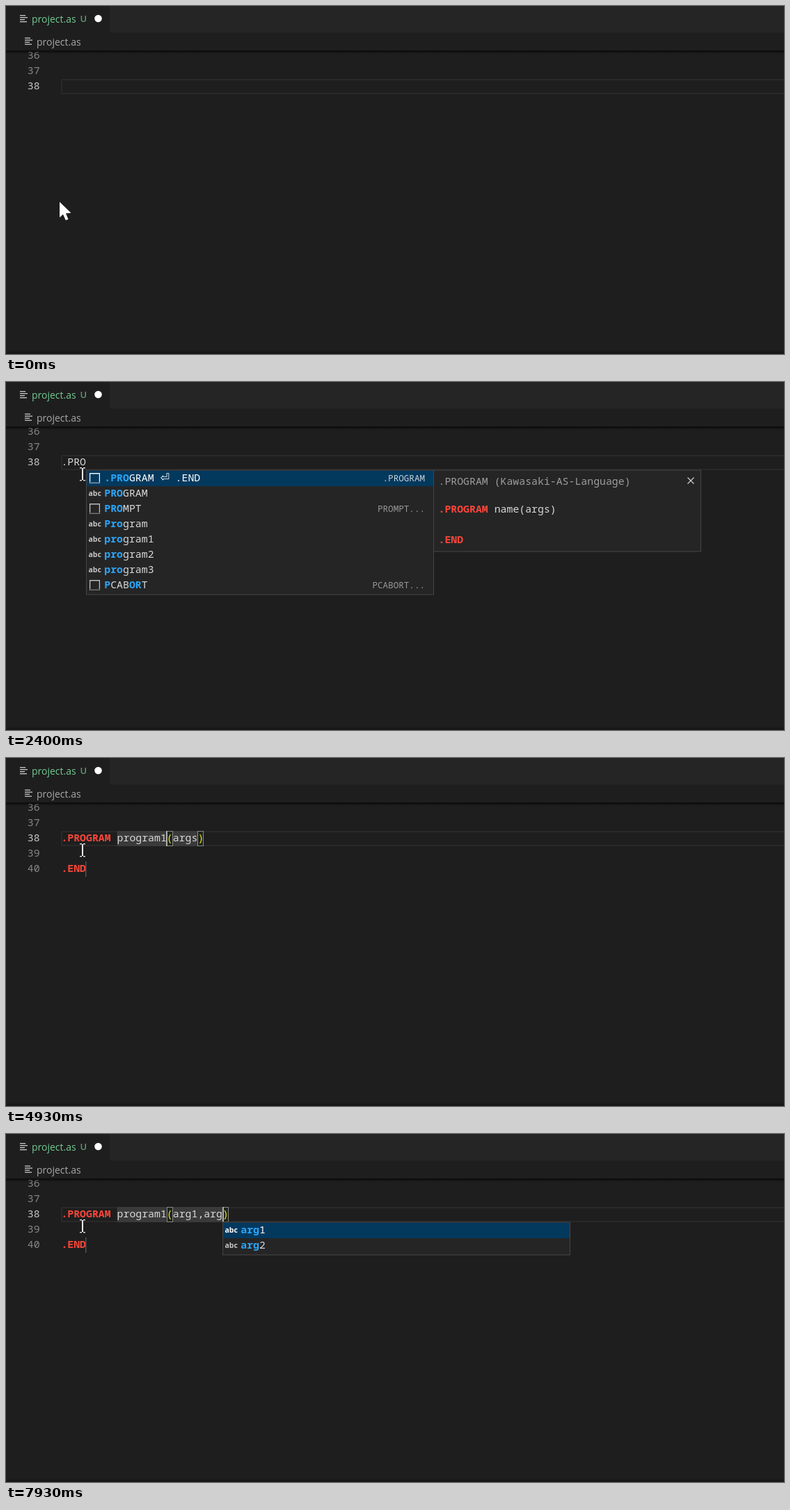
An HTML page with a canvas for the animation above (8 s loop, 1118 by 501 pixels).

```html
<!DOCTYPE html>
<html lang="en">
<head>
<meta charset="utf-8">
<title>Editor completion</title>
<style>
html, body { margin: 0; width: 100%; height: 100%; overflow: hidden; background: #1e1e1e; }
canvas { display: block; width: 1118px; height: 501px; }
</style>
</head>
<body>
<canvas id="stage" width="1118" height="501"></canvas>
<script>
const ctx = document.getElementById('stage').getContext('2d');
const LOOP = 8000, TICK = 1000 / 15;
const LEFT = 79.4, CHAR = 8.909, ROW = 22, POP_TOP = 126.5;
const MONO = '"Noto Sans Mono", "DejaVu Sans Mono", monospace';
const SANS = '"Open Sans", "Noto Sans", sans-serif';
const CODE = 14.85, SMALL = 12.6;
const TEXT = '#d8d8d8', RED = '#fb463a', BLUE = '#2aa5f7', GOLD = '#ffd91a', PANEL = '#252526', EDGE = '#454545';

// '#' marks a snippet row, braces mark matched letters
const words = ['program1', 'program2', 'program3', 'Program', 'PROGRAM'];
const lists = {
  P: ['#.PROGRAM \u23ce .END', 'PROGRAM', '#PROMPT', '#PRINT', '#PAUSE', '#PCABORT', '#PCEND', '#PCEXECUTE', 'Program', 'program1', 'program2', 'program3'],
  PRO: ['#{.PRO}GRAM \u23ce .END', 'PROGRAM', '#PROMPT', 'Program', 'program1', 'program2', 'program3', '#{P}CAB{OR}T'],
  p: [...words, '#PROMPT', '#PRINT', '#PAUSE', '#PCABORT', '#PCEND', '#PCEXECUTE', '#.PROGRAM \u23ce .END'],
  pro: [...words, '#PROMPT', '#.PROGRAM \u23ce .END', '#{P}CAB{OR}T'],
  prog: [...words, '#.PROGRAM \u23ce .END'],
  program1: ['program1'],
  a: ['arg1', 'arg2', '#ABORT', '#ABOVE', '#ABS', '#ACCEL', '#ACCURACY', '#ALIGN', '#AND', '#ASC', '#ATAN2', '#AVE_TRANS'],
  ar: ['arg1', 'arg2', '#{A}CCU{R}ACY', '#TIMER {(}comp{ar}e)', '#UTIMER {(}comp{ar}e)'],
  arg: ['arg1', 'arg2'],
  arg1: ['arg1']
};

// time, program name, arguments, caret column, list, matched letters, options
const steps = [
  [2800, 'name', 'args', 13, '', '', { select: [9, 13] }],
  [3800, 'p', 'args', 10],
  [3870, 'p', 'args', 10, 'p', 'p'],
  [3930, 'pr', 'args', 11, 'p', 'p'],
  [4000, 'pr', 'args', 11, 'pro', 'pr'],
  [4070, 'pro', 'args', 12, 'pro', 'pro'],
  [4200, 'prog', 'args', 13, 'prog', 'prog'],
  [4330, 'progr', 'args', 14, 'prog', 'progr'],
  [4400, 'progra', 'args', 15, 'prog', 'progra'],
  [4530, 'program', 'args', 16, 'prog', 'program'],
  [4670, 'program1', 'args', 17, 'program1', 'program1'],
  [4930, 'program1', 'args', 17],
  [5800, 'program1', 'args', 22, '', '', { select: [18, 22], pair: true }],
  [5870, 'program1', 'args', 22, '', '', { select: [18, 22] }],
  [6070, 'program1', 'a', 19],
  [6130, 'program1', 'a', 19, 'a', 'a'],
  [6200, 'program1', 'ar', 20, 'ar', 'ar'],
  [6400, 'program1', 'arg', 21, 'arg', 'arg'],
  [6670, 'program1', 'arg1', 22, 'arg1', 'arg1'],
  [7130, 'program1', 'arg1,', 23],
  [7600, 'program1', 'arg1,a', 24],
  [7670, 'program1', 'arg1,a', 24, 'a', 'a', { max: 10 }],
  [7800, 'program1', 'arg1,ar', 25, 'ar', 'ar'],
  [7930, 'program1', 'arg1,arg', 26, 'arg', 'arg']
];
// time, typed text, list, matched letters, help panel
const typing = [
  [0, ''], [1400, '.'], [1670, '.P'], [1730, '.P', 'P', 'P', true],
  [1800, '.PR', 'PRO', 'PR', true], [1870, '.PRO', 'PRO', 'PRO'], [1930, '.PRO', 'PRO', 'PRO', true]
];
const caretOn = [[470, 1000], [1400, 2400], [2800, 3270], [3800, 5200], [5670, LOOP]];

const latest = (list, t) => list.filter(s => s[0] <= t).pop();
const colX = c => LEFT + c * CHAR;

function rect(x, y, w, h, color) {
  ctx.fillStyle = color;
  ctx.fillRect(x, y, w, h);
}

function frame(x, y, w, h, color) {
  ctx.strokeStyle = color;
  ctx.lineWidth = 1;
  ctx.strokeRect(x + .5, y + .5, w - 1, h - 1);
}

function label(str, x, y, color, font, align = 'left') {
  ctx.font = font;
  ctx.fillStyle = color;
  ctx.textAlign = align;
  ctx.fillText(str, x, y);
}

function code(str, x, y, color = TEXT, bold = false) {
  label(str, x, y, color, `${bold ? 700 : 500} ${CODE}px ${MONO}`);
  return x + str.length * CHAR;
}

function fileIcon(x, y) {
  [8, 11, 7, 10].forEach((w, i) => rect(x, y + i * 3, w, 1.3, '#c8c8c8'));
}

function header() {
  rect(0, 0, 1118, 65, '#1e1e1e');
  rect(149, 0, 969, 38, PANEL);
  fileIcon(20, 13);
  label('project.as', 37, 24, '#73c991', `14px ${SANS}`);
  label('U', 106.5, 23, '#5a9a70', `600 13px ${SANS}`);
  ctx.fillStyle = '#fff';
  ctx.beginPath();
  ctx.arc(132.5, 18, 5.3, 0, 7);
  ctx.fill();
  fileIcon(27, 45.5);
  label('project.as', 44, 56.5, '#a9a9a9', `14px ${SANS}`);
  shade(64, 69, '#000000b0', '#00000000');
  shade(496, 501, '#00000000', '#00000048');
}

function shade(top, bottom, from, to) {
  const g = ctx.createLinearGradient(0, top, 0, bottom);
  g.addColorStop(0, from);
  g.addColorStop(1, to);
  rect(0, top, 1118, bottom - top, g);
}

function marked(item, query) {
  if (item.includes('{')) return item;
  const i = item.toLowerCase().indexOf(query.toLowerCase());
  return i < 0 ? item : item.slice(0, i) + '{' + item.slice(i, i + query.length) + '}' + item.slice(i + query.length);
}

function snippetIcon(x, y, color) {
  rect(x, y, 15, 1.4, color);
  rect(x, y, 1.2, 13, color);
  rect(x + 13.8, y, 1.2, 13, color);
  for (let i = 0; i < 8; i++) rect(x + i * 2, y + 13.6, 1, 1.4, color);
}

function row(item, query, x, y, active) {
  const snippet = item[0] === '#';
  const name = snippet ? item.slice(1) : item;
  const ink = active ? '#fff' : TEXT;
  if (active) rect(x + 1, y, 498, 22.5, '#04395e');
  if (snippet) snippetIcon(x + 5, y + 3.5, active ? '#fff' : '#c5c5c5');
  else label('abc', x + 3.5, y + 14.5, active ? '#fff' : '#c5c5c5', `700 10.5px ${SANS}`);

  let pen = x + 26.3;
  marked(name, query).split(/([{}\u23ce])/).reduce((on, part) => {
    if (part === '{' || part === '}') return part === '{';
    if (part === '\u23ce') {
      label(part, pen, y + 15.5, ink, '16px "DejaVu Sans", sans-serif');
      pen += 13.2;
    } else pen = code(part, pen, y + 15.5, on ? BLUE : ink, on);
    return on;
  }, false);

  if (snippet) {
    const plain = name.replace(/[{}]/g, '');
    const note = plain[0] === '.' ? '.PROGRAM' : plain.replace(/^\w+/, '$&...');
    label(note, x + 487, y + 15, active ? '#c8d0d6' : '#989898', `500 ${SMALL}px ${MONO}`, 'right');
  }
}

function popup(col, items, query) {
  const x = Math.round(colX(col)), h = items.length * ROW + 4;
  rect(x, POP_TOP, 500, h, PANEL);
  items.forEach((item, i) => row(item, query, x, POP_TOP + 1 + i * ROW, i === 0));
  frame(x, POP_TOP, 500, h, EDGE);
  return x + 500;
}

function help(x) {
  rect(x, POP_TOP, 384, 118, PANEL);
  frame(x - 1, POP_TOP, 385, 118, EDGE);
  code('.PROGRAM (Kawasaki-AS-Language)', x + 6.5, 148, '#9d9d9d');
  const next = code('.PROGRAM', x + 6.5, 188, RED, true);
  code(' name(args)', next, 188);
  code('.END', x + 6.5, 232, RED, true);
  ctx.strokeStyle = '#d0d0d0';
  ctx.lineWidth = 1.2;
  ctx.beginPath();
  ctx.moveTo(x + 364.5, 137.5);
  ctx.lineTo(x + 373.5, 146.5);
  ctx.moveTo(x + 373.5, 137.5);
  ctx.lineTo(x + 364.5, 146.5);
  ctx.stroke();
}

function caret(t, col) {
  if (caretOn.some(([a, b]) => t >= a && t < b)) rect(Math.floor(colX(col)), 105, 2, 22, '#aeafad');
}

function span(from, to, color) {
  rect(colX(from), 105, (to - from) * CHAR, 22, color);
}

function snippetLines(t) {
  const [, name, args, col, list, query, opt = {}] = latest(steps, t);
  const open = 9 + name.length, close = open + 1 + args.length;
  span(9, open, '#3a3a3a');
  span(open + 1, close, '#3a3a3a');
  if (opt.select) span(...opt.select, '#264f78');
  if (!opt.select || opt.pair) {
    for (const c of [open, close]) {
      const x = Math.round(colX(c));
      rect(x, 105, 9, 22, '#1c251c');
      frame(x, 105, 9, 22, '#888');
    }
  }
  code('.PROGRAM', LEFT, 120, RED, true);
  let x = code(name, colX(9), 120);
  x = code('(', x, 120, GOLD);
  x = code(args, x, 120);
  code(')', x, 120, GOLD);
  code('.END', LEFT, 164, RED, true);
  rect(114, 149, 1.5, 22, '#525252');
  caret(t, col);
  if (list) popup(col, lists[list].slice(0, opt.max || 12), query);
}

function typedLine(t) {
  const [, str, list, query, info] = latest(typing, t);
  code(str, LEFT, 120);
  caret(t, str.length);
  if (!list) return;
  const edge = popup(str.length, lists[list], query);
  if (info) help(edge);
}

function pointer(t) {
  const p = Math.min(1, t / 400), e = p * p * (3 - 2 * p);
  const x = 77 + 33 * e, y = 282 - 150 * e;
  ctx.fillStyle = '#fff';
  if (x < 81) {
    ctx.beginPath();
    [[0, 0], [0, 22.5], [5, 18], [8.8, 26.5], [12.5, 25], [9, 16.5], [16.5, 16]].forEach(([a, b]) => ctx.lineTo(x + a, y + b));
    ctx.closePath();
    ctx.strokeStyle = '#111';
    ctx.lineWidth = 1;
    ctx.stroke();
    ctx.fill();
  } else {
    const cx = Math.round(x), cy = Math.round(y);
    rect(cx - 1, cy - 8, 2, 17, '#f2f2f2');
    for (const s of [-9, 9]) {
      rect(cx - 4, cy + s, 3, 1.3, '#f2f2f2');
      rect(cx + 1, cy + s, 3, 1.3, '#f2f2f2');
    }
  }
}

function draw(t) {
  rect(0, 0, 1118, 501, '#1e1e1e');
  const expanded = t >= 2800;
  for (let n = 36; n <= (expanded ? 40 : 38); n++)
    code(String(n), 30.8, 76 + (n - 36) * ROW, n === 38 ? '#c6c6c6' : '#858585');
  ctx.strokeStyle = '#292929';
  ctx.lineWidth = 2;
  ctx.strokeRect(80, 106, 1060, 20);
  if (expanded) snippetLines(t);
  else typedLine(t);
  header();
  pointer(t);
}

const start = performance.now();
function loop() {
  const t = (performance.now() - start) % LOOP;
  // round up slightly so that each tick lands on its listed time
  draw(Math.ceil(Math.floor(t / TICK + .06) * TICK / 10) * 10);
  requestAnimationFrame(loop);
}
loop();
</script>
</body>
</html>
```
